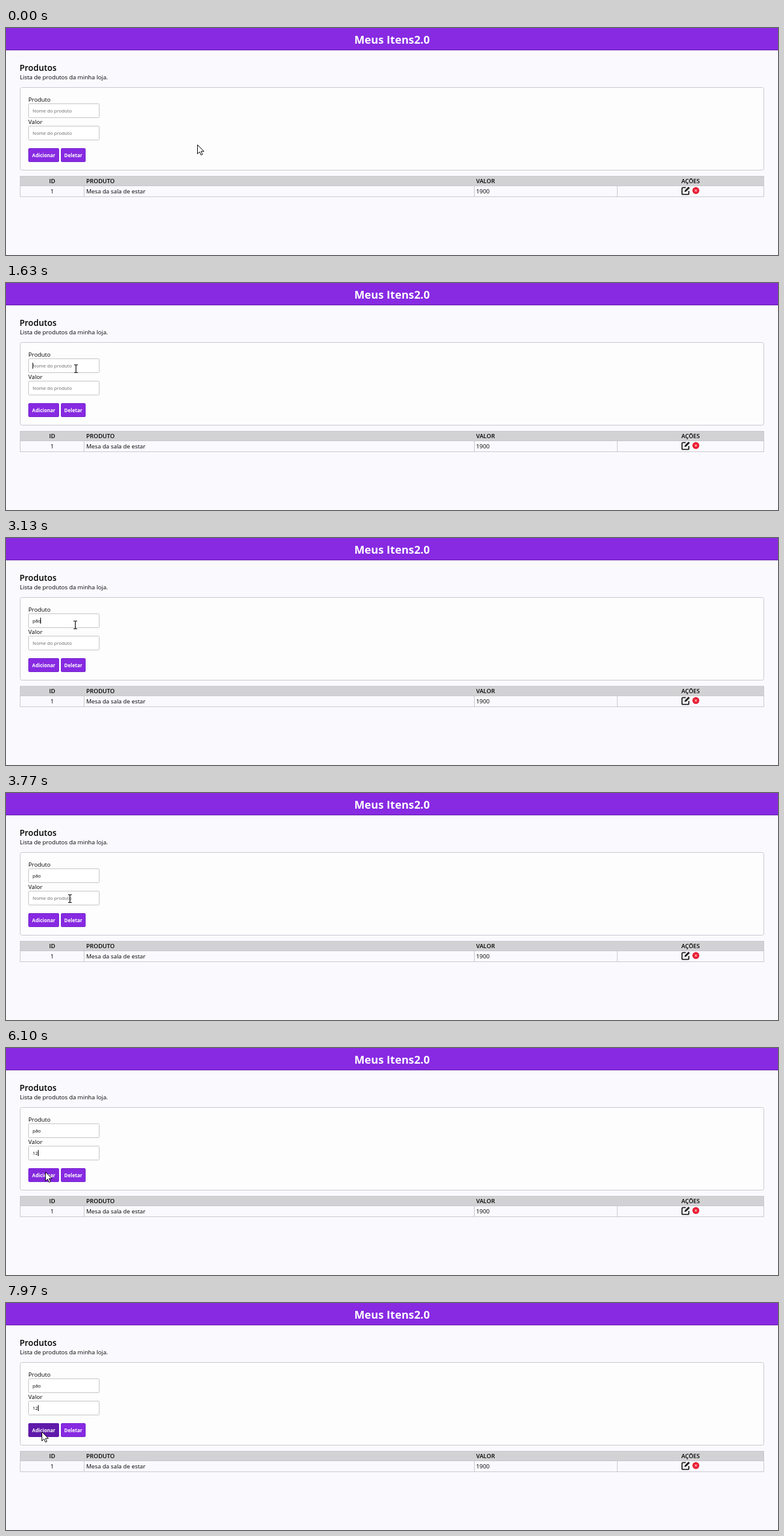
Write an HTML page that moves like this. It is 1280 px wide and 376 px high and loops after 8 s.

```html
<!DOCTYPE html>
<html lang="pt">
<head>
<meta charset="utf-8">
<title>Produtos</title>
<style>
  html, body { margin: 0; width: 100%; height: 100%; overflow: hidden; background: #fafafe; }
  svg { display: block; width: 100vw; height: 100vh; }
  text { font: 9.75px "Open Sans", "Noto Sans", sans-serif; fill: #000; white-space: pre; }
  .title { font-size: 18.2px; font-weight: 700; fill: #fff; }
  .heading { font-size: 14px; font-weight: 600; }
  .head { font-weight: 600; }
  .field { font-size: 7.8px; }
  .button { font-size: 8px; font-weight: 700; fill: #fff; }
  .mid { text-anchor: middle; }
  .line { fill: none; stroke: #c6c6cf; }
</style>
</head>
<body>
<svg viewBox="0 0 1280 376" preserveAspectRatio="none">
  <rect width="1280" height="376" fill="#fafafe"/>
  <rect width="1280" height="37" fill="#872ae2"/>
  <rect y="36" width="1280" height="1" fill="#6320ac"/>
  <text class="title mid" x="640" y="26.2">Meus Itens2.0</text>

  <text class="heading" x="22.5" y="71">Produtos</text>
  <text x="23" y="85">Lista de produtos da minha loja.</text>

  <rect x="23.5" y="98.5" width="1233" height="137" rx="3" fill="#fdfdfd" stroke="#c6c6cf"/>
  <text x="37" y="122">Produto</text>
  <text x="37" y="159">Valor</text>
  <g fill="#fff" stroke="#c3c3c8">
    <rect x="37.5" y="125.5" width="117" height="23" rx="1"/>
    <rect x="37.5" y="162.5" width="117" height="23" rx="1"/>
  </g>
  <text class="field" id="product" x="44" y="139.5"></text>
  <text class="field" id="price" x="44" y="177.3"></text>
  <rect id="caret" width="1" height="10" fill="#000"/>

  <g fill="#872ae2" stroke="#7524cc">
    <rect id="add" x="37.5" y="199.5" width="50" height="22" rx="1.5"/>
    <rect x="91.5" y="199.5" width="40" height="22" rx="1.5"/>
  </g>
  <text class="button mid" x="62.5" y="213.5">Adicionar</text>
  <text class="button mid" x="111.5" y="213.5">Deletar</text>

  <rect x="23" y="245" width="1234" height="16" fill="#d2d2d4"/>
  <path class="line" d="M23.5 245.5H1256.5V279.5H23.5ZM23 261.5H1257M129.5 261V279M776.5 261V279M1013.5 261V279"/>
  <text class="head mid" x="76.5" y="257.3">ID</text>
  <text class="head" x="133" y="257.3">PRODUTO</text>
  <text class="head" x="779.5" y="257.3">VALOR</text>
  <text class="head mid" x="1135" y="257.3">AÇÕES</text>
  <text class="mid" x="76.5" y="274">1</text>
  <text x="133" y="274">Mesa da sala de estar</text>
  <text x="779.5" y="274">1900</text>

  <g fill="none" stroke="#1c1c1c" stroke-width="1.8">
    <path d="M1127 264.3H1122.5Q1120.8 264.3 1120.8 266V274Q1120.8 275.7 1122.5 275.7H1130.5Q1132.2 275.7 1132.2 274V270"/>
    <path d="M1125.4 271.2L1126 268.8L1131.6 263.2L1133.4 265L1127.8 270.6Z" fill="#1c1c1c" stroke-width=".8"/>
  </g>
  <circle cx="1143.8" cy="269.3" r="5.7" fill="#ea1c32"/>
  <path d="M1142 267.5l3.6 3.6m0-3.6l-3.6 3.6" stroke="#f9b4bb" stroke-width="1.1"/>

  <path id="arrow" d="M.5 .5V15.5L4 12.2L6.4 17.5L8.8 16.4L6.4 11.3H11.2Z" fill="#fff" stroke="#000" stroke-linejoin="round"/>
  <path id="beam" d="M-3 -6.5H-1L0 -5.8L1 -6.5H3M0 -6V6M-3 6.5H-1L0 5.8L1 6.5H3" fill="none" stroke="#000" stroke-width="1.2"/>
</svg>
<script>
const LOOP = 8000;
const PLACEHOLDER = 'Nome do produto';
const PRICE_FOCUS = 3950;
const $ = id => document.getElementById(id);
const product = $('product'), price = $('price'), caret = $('caret');
const arrow = $('arrow'), beam = $('beam'), add = $('add');

// Pointer moves: start, end, target x, target y
const moves = [
  [60, 680, 116, 142],
  [3050, 3600, 106, 175],
  [5350, 5980, 65, 205],
  [6150, 6650, 59, 213]
];
const productKeys = [[1950, 'p'], [2320, 'pã'], [2800, 'pão']];
const priceKeys = [[4500, '1'], [4950, '12']];

const clamp = v => Math.max(0, Math.min(1, v));
const ease = v => v * v * (3 - 2 * v);
const mix = (a, b, k) => a + (b - a) * k;

function pointerAt(t) {
  let x = 317, y = 193;
  for (const [start, end, toX, toY] of moves) {
    const k = ease(clamp((t - start) / (end - start)));
    x = mix(x, toX, k);
    y = mix(y, toY, k);
  }
  return [Math.round(x), Math.round(y)];
}

const typed = (keys, t) => keys.reduce((value, [at, text]) => t >= at ? text : value, '');

function setField(node, value) {
  const text = value || PLACEHOLDER;
  if (node.textContent !== text) node.textContent = text;
  node.style.fill = value ? '#000' : '#666';
}

// The blink restarts on focus and on every key.
function drawCaret(t, inPrice, node, value) {
  const focusAt = inPrice ? PRICE_FOCUS : 1150;
  const keys = inPrice ? priceKeys : productKeys;
  const since = t - keys.reduce((last, [at]) => t >= at ? at : last, focusAt);
  const visible = since >= 0 && since % 1000 < 500;
  caret.style.display = visible ? '' : 'none';
  if (!visible) return;
  const width = value ? node.getComputedTextLength() : 0;
  caret.setAttribute('x', Math.round(44 + width - .4));
  caret.setAttribute('y', inPrice ? 169 : 132);
}

function render(t) {
  const productValue = typed(productKeys, t);
  const priceValue = typed(priceKeys, t);
  setField(product, productValue);
  setField(price, priceValue);
  const inPrice = t >= PRICE_FOCUS;
  drawCaret(t, inPrice, inPrice ? price : product, inPrice ? priceValue : productValue);

  const [x, y] = pointerAt(t);
  const overInput = x >= 37 && x <= 155 && (y >= 125 && y <= 149 || y >= 162 && y <= 186);
  arrow.style.display = overInput ? 'none' : '';
  beam.style.display = overInput ? '' : 'none';
  (overInput ? beam : arrow).setAttribute('transform', `translate(${x} ${y})`);

  const hover = ease(clamp((t - 6000) / 500));
  const shade = [[135, 96], [42, 26], [226, 170]].map(([a, b]) => Math.round(mix(a, b, hover)));
  add.setAttribute('fill', `rgb(${shade})`);
  add.setAttribute('stroke', hover ? `rgb(${shade})` : '#7524cc');
}

const began = performance.now();
function tick() {
  render((performance.now() - began) % LOOP);
  requestAnimationFrame(tick);
}
tick();
</script>
</body>
</html>
```
